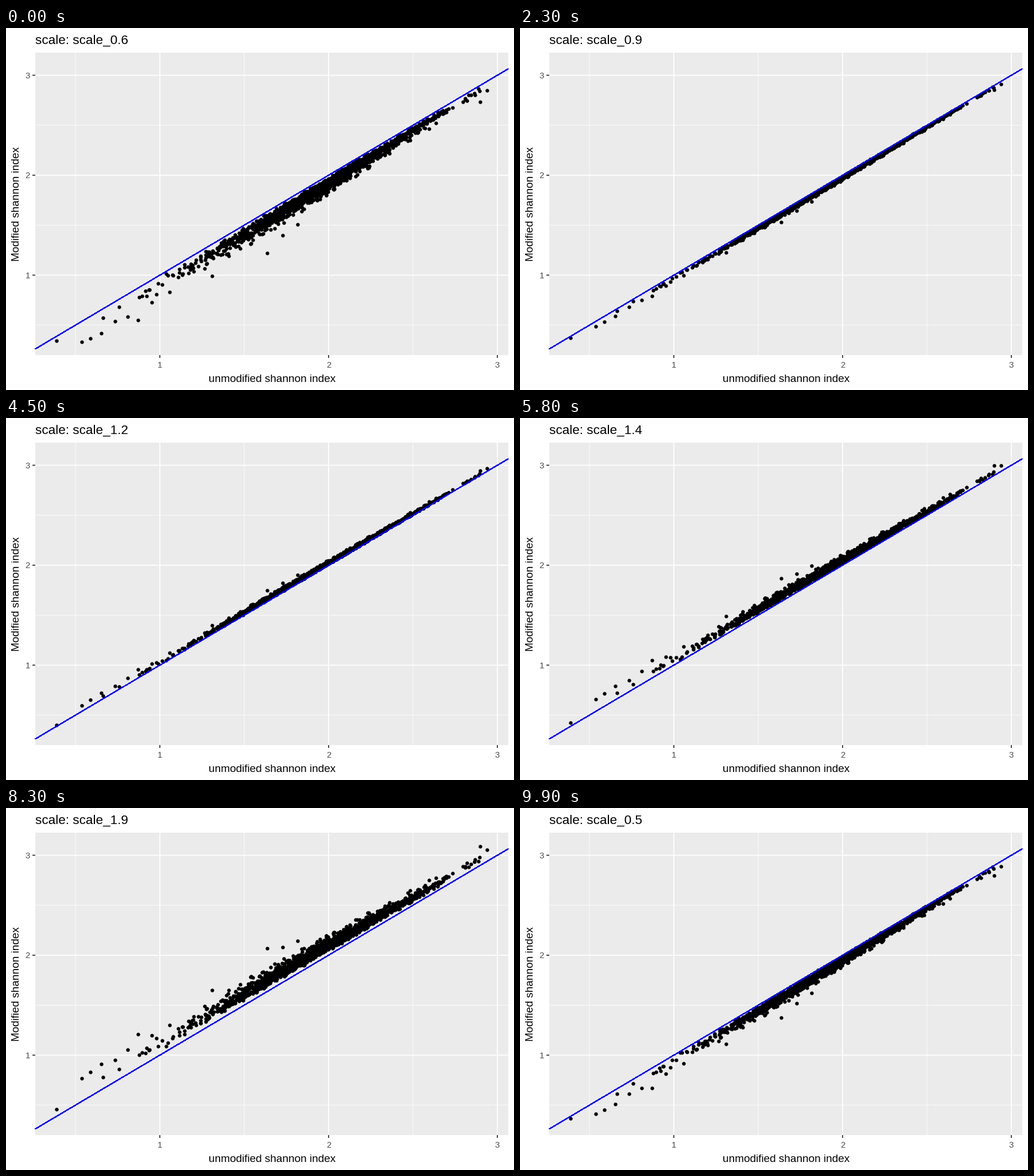
A matplotlib script that plays this animation: 885 px wide and 632 px high, repeating every 10 s.

```python
import numpy as np
import matplotlib.pyplot as plt
from matplotlib.animation import FuncAnimation
from matplotlib.patches import Rectangle

W, H, DPI = 885, 632, 100
LEFT, RIGHT, TOP, BOTTOM = 51, 875, 43, 571
PT = 72 / DPI

plt.rcParams["font.family"] = "Liberation Sans"


def px(v):
    return 268 + (v - 1) * 294


def py(v):
    return 431.5 - (v - 1) * 174.5


def diagonal(x):
    """Pixel height of the line y = x at pixel column x."""
    return py(1 + (x - 268) / 294)


# Most isolated points: column and depth below the diagonal at scale 0.5
strays = [(88, 7.5), (132, 36), (147, 39), (166, 41), (169, 15.5),
          (190, 34), (197, 13), (212, 39), (230, 55.5), (359, 56),
          (455, 72.5), (482, 58), (508, 54), (826, 29), (838, 16)]
stray_x, stray_depth = np.array(strays).T

# Dense band with thin ends
rng = np.random.default_rng(12)
v = rng.normal(1.95, 0.35, 1480)
v = np.concatenate([v[(v > 1.1) & (v < 2.7)],
                    rng.uniform(0.85, 1.1, 15),
                    rng.uniform(2.7, 2.9, 12)])
mean_depth = np.minimum(17, 27.5 - 6.7 * v)
spread = np.clip(rng.gamma(5.5, 1 / 5.5, v.size), 0.2, 2.3)

x = np.concatenate([stray_x, px(v)])
depth = np.concatenate([stray_depth, mean_depth * spread])
top = 5 + 0.97 * depth

# Rise over the diagonal: a*ln(s) + b*(s - 1), from -depth up to top
scales = np.arange(5, 21) / 10
S_LOW, S_HIGH = 0.5, 1.817
basis = np.array([[np.log(s), s - 1] for s in (S_LOW, S_HIGH)])
a, b = np.linalg.solve(basis, np.array([-depth, top]))
rise = np.outer(np.log(scales), a) + np.outer(scales - 1, b)
heights = diagonal(x) - rise

# Frames spent between neighbouring states, the last one wraps round
steps = [7, 6] * 4 + [6] * 8
keys = np.concatenate([[0], np.cumsum(steps)])
FRAMES = int(keys[-1])
N = len(scales)

fig = plt.figure(figsize=(W / DPI, H / DPI), dpi=DPI, facecolor="white")
ax = fig.add_axes([0, 0, 1, 1])
ax.set_xlim(0, W)
ax.set_ylim(H, 0)
ax.axis("off")


def line(xs, ys, color, width, z, **kw):
    ax.plot(xs, ys, color=color, lw=width * PT, zorder=z,
            solid_capstyle="butt", **kw)


def label(x, y, s, size, color="black", va="baseline", **kw):
    return ax.text(x, y, s, fontsize=size * PT, color=color, va=va, **kw)


def grid(g, width):
    line([px(g)] * 2, [TOP, BOTTOM], "white", width, 1, snap=False)
    line([LEFT, RIGHT], [py(g)] * 2, "white", width, 1, snap=False)


ax.add_patch(Rectangle((LEFT, TOP), RIGHT - LEFT, BOTTOM - TOP,
                       fc="#EBEBEB", ec="none", zorder=0))
for g in (0.5, 1.5, 2.5):
    grid(g, 0.89)
for g in (1, 2, 3):
    grid(g, 1.78)
    line([px(g)] * 2, [BOTTOM, BOTTOM + 5], "#333333", 1.78, 2, snap=False)
    line([LEFT - 5, LEFT], [py(g)] * 2, "#333333", 1.78, 2, snap=False)
    label(px(g), 593, str(g), 15, "#4D4D4D", ha="center")
    label(42, py(g) + 5.5, str(g), 15, "#4D4D4D", ha="right")

label(463.5, 618.5, "unmodified shannon index", 19, ha="center")
label(18.5, 307.5, "Modified shannon index", 19, va="center",
      rotation=90, ha="center")
title = label(51, 28, "", 22.5)

dots, = ax.plot(x, heights[0], "o", color="black", ms=6.4 * PT, mew=0,
                antialiased=False, zorder=3)
line([LEFT, RIGHT], [diagonal(LEFT), diagonal(RIGHT)], "blue", 1.2, 4,
     antialiased=False)


def update(i):
    pos = np.interp(i, keys, np.arange(N + 1))
    k = int(pos)
    t = pos - k
    dots.set_ydata((1 - t) * heights[k] + t * heights[(k + 1) % N])
    upcoming = max(1, int(np.searchsorted(keys, i))) % N
    title.set_text(f"scale: scale_{scales[upcoming]:g}")
    return dots, title


anim = FuncAnimation(fig, update, frames=FRAMES, interval=100,
                     repeat=True, repeat_delay=0)
plt.show()
```
